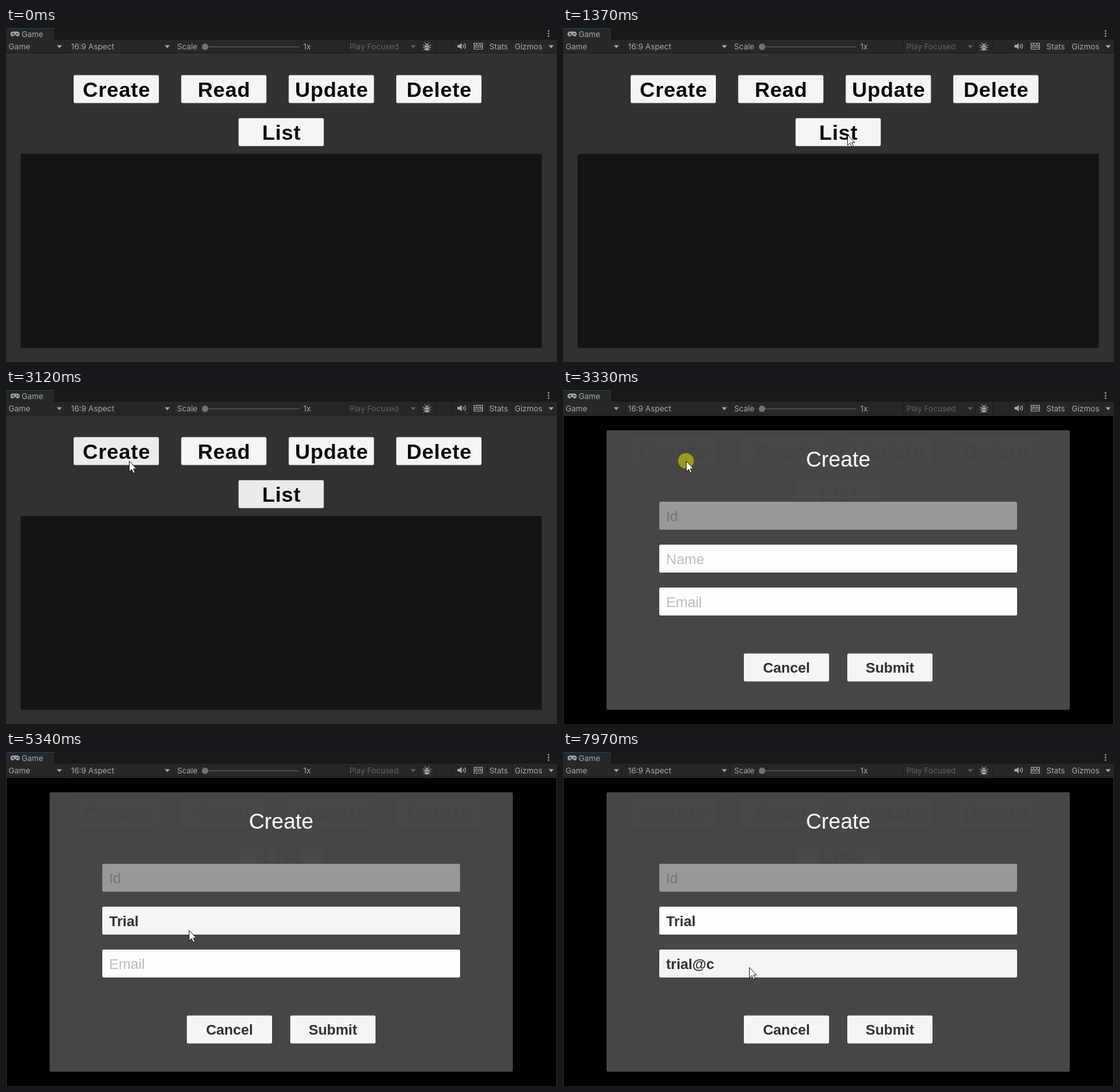
An HTML page that plays this animation: 847 by 514 pixels, repeating every 8000 ms.

```html
<!DOCTYPE html>
<html lang="en">
<head>
<meta charset="utf-8">
<title>Create form</title>
<style>
  html, body { margin: 0; width: 100%; height: 100%; overflow: hidden; background: #313131; }
  svg { display: block; }
  text { font-family: "Liberation Sans", Arial, sans-serif; }
  .ui { font: 12px Inter, sans-serif; fill: #a9a9a9; }
  .big { font-size: 32px; font-weight: bold; letter-spacing: .7px; fill: #080808; text-anchor: middle; }
  .mid { font-size: 22px; font-weight: bold; fill: #323232; }
  .hint { font-size: 22px; fill: #bebebe; }
  .title { font-size: 33px; fill: #fff; text-anchor: middle; }
  .off { fill: #626262; }
  .locked { fill: #747474; }
  .center { text-anchor: middle; }
</style>
</head>
<body>
<svg width="847" height="514" viewBox="0 0 847 514">
  <rect width="847" height="514" fill="#313131"/>
  <g id="bar"></g>
  <g id="home"><rect x="22.5" y="193.8" width="801" height="298.4" rx="2" fill="#141414"/></g>
  <g id="modal">
    <rect x="1" y="40" width="845" height="474" fill="#000"/>
    <rect x="67" y="62" width="712" height="430" rx="2" fill="#464646"/>
    <g id="ghost" opacity=".009"></g>
    <text class="title" x="423" y="117.5">Create</text>
    <circle id="click" cx="189" cy="109" r="12" fill="#9b9a22"/>
  </g>
  <path id="cursor" d="M.5.5V16.6L4.2 13.1L6.8 18.8L9.3 17.7L6.8 12.2H11.6Z" fill="#fff" stroke="#111" stroke-width=".9"/>
</svg>
<script>
const LOOP = 8000, OPEN = 3330;
const $ = id => document.getElementById(id);

function add(parent, tag, attrs, text) {
  const el = document.createElementNS("http://www.w3.org/2000/svg", tag);
  for (const k in attrs) el.setAttribute(k, attrs[k]);
  if (text) el.textContent = text;
  parent.appendChild(el);
  return el;
}
const box = (parent, x, y, width, height, fill, rx = 0) =>
  add(parent, "rect", { x, y, width, height, fill, rx });
const label = (parent, style, x, y, text) =>
  add(parent, "text", { class: style, x, y }, text);

// Window tab and toolbar
function drawBar() {
  const g = $("bar"), grey = "#a9a9a9", dim = "#626262", face = "#272727";
  const line = (d, stroke, w = 1) => add(g, "path", { d, stroke, "stroke-width": w, fill: "none" });
  const dot = (cx, cy, r, fill) => add(g, "circle", { cx, cy, r, fill });
  const item = (x, text, style = "ui") => label(g, style, x, 33, text);
  const arrow = (x, fill) => add(g, "path", { d: `M${x - 4} 26.5h8l-4 4.5z`, fill });

  box(g, 0, 0, 847, 18, "#191919");
  box(g, 0, 0, 74, 18, face);
  box(g, 0, 0, 74, 1, "#1d405e");
  box(g, 0, 18, 847, 21, face);
  box(g, 0, 38, 847, 1, "#1b1b1b");
  line("M90.5 18v20m6-20v20m160-20v20m267-20v20", "#1d1d1d");
  for (let i = 0; i < 5; i++) box(g, Math.round(634 + 26.2 * i), 18, 1, 20, "#1d1d1d");
  box(g, 778, 18, 1, 20, "#1d1d1d");

  label(g, "ui", 24, 14, "Game");
  item(4, "Game");
  item(100, "16:9 Aspect");
  item(263, "Scale");
  item(457, "1x");
  item(528, "Play Focused", "ui off");
  item(743, "Stats");
  item(782, "Gizmos");
  arrow(82, grey);
  arrow(248, grey);
  arrow(626, dim);
  arrow(838, grey);

  box(g, 306, 28, 145, 2, "#484848");
  dot(306, 29, 5, "#727272");
  for (let i = 0; i < 3; i++) dot(834, 4.5 + 4 * i, 1.2, grey);

  // gamepad
  box(g, 7, 5.5, 14, 7.5, grey, 3.7);
  box(g, 11.5, 11, 5, 3, face, 1.5);
  line("M9 9.2h4M11 7.2v4", face);
  dot(16, 9, .9, face);
  dot(18.5, 9, .9, face);
  // bug
  add(g, "ellipse", { cx: 647, cy: 29.5, rx: 3.7, ry: 5.3, fill: grey });
  line("M643.5 22l2 2.5m5-2.5l-2 2.5m-8 1.5l4 1.5m9-1.5l-4 1.5M640.5 30h13M641.5 34.5l3-2m8 2l-3-2", grey);
  line("M643 27h8m-8 3.5h8", face, .8);
  // speaker
  add(g, "path", { d: "M694 26h3l3.5-3v10l-3.5-3h-3z", fill: grey });
  line("M702.5 25.5q2 2.5 0 5m2.3-6.7q3.2 4.2 0 8.4", grey, 1.2);
  // keyboard
  add(g, "rect", { x: 719.5, y: 23.5, width: 13, height: 9, fill: "none", stroke: grey });
  line("M720 26.5h12m-12 3h12m-8.5-5.5v2.5m5-2.5v2.5m-6.5.5v2.5m4-2.5v2.5m4-2.5v2.5", grey, .9);
}

function bigButton(parent, x, y, text) {
  const face = box(parent, x, y, 131, 43, "#f5f5f5", 2);
  label(parent, "big", x + 66, y + 33.5, text);
  return face;
}

function drawButtons(parent) {
  const [create] = ["Create", "Read", "Update", "Delete"].map((text, i) =>
    bigButton(parent, 104 + 165.3 * i, 72.5, text));
  return { create, list: bigButton(parent, 357.5, 138.8, "List") };
}

function drawField(row, hint, fill, style = "") {
  const g = $("modal"), y = 172 + 66 * row;
  return {
    face: box(g, 148, y, 550, 43, fill, 2),
    hint: label(g, "hint " + style, 158.5, y + 29.5, hint),
    value: label(g, "mid", 158.5, y + 29.5, "")
  };
}

drawBar();
const { create, list } = drawButtons($("home"));
drawButtons($("ghost"));
drawField(0, "Id", "#989898", "locked");
const nameField = drawField(1, "Name", "#fdfdfd");
const mailField = drawField(2, "Email", "#fdfdfd");
["Cancel", "Submit"].forEach((text, i) => {
  const x = 278 + 159 * i;
  box($("modal"), x, 405.5, 131, 43, "#f5f5f5", 2);
  label($("modal"), "mid center", x + 65.5, 435, text);
});

const easeIn = u => u ** 1.5;
const easeOut = u => 1 - (1 - u) ** 1.5;
const easeBoth = u => u * u * (3 - 2 * u);

// Each stroke runs on from the last one; via bends it
const strokes = [];
function stroke(start, end, ease, to, via) {
  const from = strokes.length ? strokes[strokes.length - 1].to : [576, 0];
  strokes.push({ start, end, ease, from, to, via: via || from.map((v, k) => (v + to[k]) / 2) });
}
stroke(430, 1190, easeOut, [405, 174], [470, 239]);
stroke(1275, 1370, easeOut, [437, 164]);
stroke(2040, 2840, easeIn, [238, 193], [291, 498]);
stroke(2845, 3120, easeOut, [189, 109]);
stroke(3595, 4410, easeBoth, [281, 274]);
stroke(5935, 6150, easeBoth, [285, 384]);
stroke(6315, 6760, easeOut, [286, 331]);

function pointer(t) {
  const s = strokes.filter(s => s.start <= t).pop();
  if (!s) return null;
  const u = s.ease(Math.min(1, (t - s.start) / (s.end - s.start))), w = 1 - u;
  return s.from.map((v, k) => Math.round(w * w * v + 2 * w * u * s.via[k] + u * u * s.to[k]));
}

function fade(el, t, start, from, to) {
  const u = Math.min(1, Math.max(0, (t - start) / 180));
  const v = Math.round(from + (to - from) * u);
  el.setAttribute("fill", `rgb(${v},${v},${v})`);
}

// Even keystrokes, with a pause before each later part
function type(field, t, ...parts) {
  const text = parts.map(([part, start, gap]) =>
    part.slice(0, Math.max(0, Math.floor((t - start) / gap) + 1))).join("");
  field.value.textContent = text;
  show(field.hint, !text);
}

const show = (el, on) => el.setAttribute("visibility", on ? "inherit" : "hidden");

function draw(t) {
  $("modal").style.display = t >= OPEN ? "" : "none";
  show($("click"), t < OPEN + 80);

  fade(list, t, 1640, 245, 235);
  fade(create, t, 2940, 245, 236);
  if (t < 6000) fade(nameField.face, t, 4270, 253, 245);
  else fade(nameField.face, t, 6500, 245, 254);
  fade(mailField.face, t, 6500, 253, 245);

  type(nameField, t, ["Tria", 4980, 73], ["l", 5340, 1]);
  type(mailField, t, ["trial", 7140, 82], ["@c", 7730, 240]);

  const at = pointer(t);
  show($("cursor"), at);
  if (at) $("cursor").setAttribute("transform", `translate(${at})`);
}

const start = performance.now();
function tick() {
  draw((performance.now() - start) % LOOP);
  requestAnimationFrame(tick);
}
tick();
</script>
</body>
</html>
```
